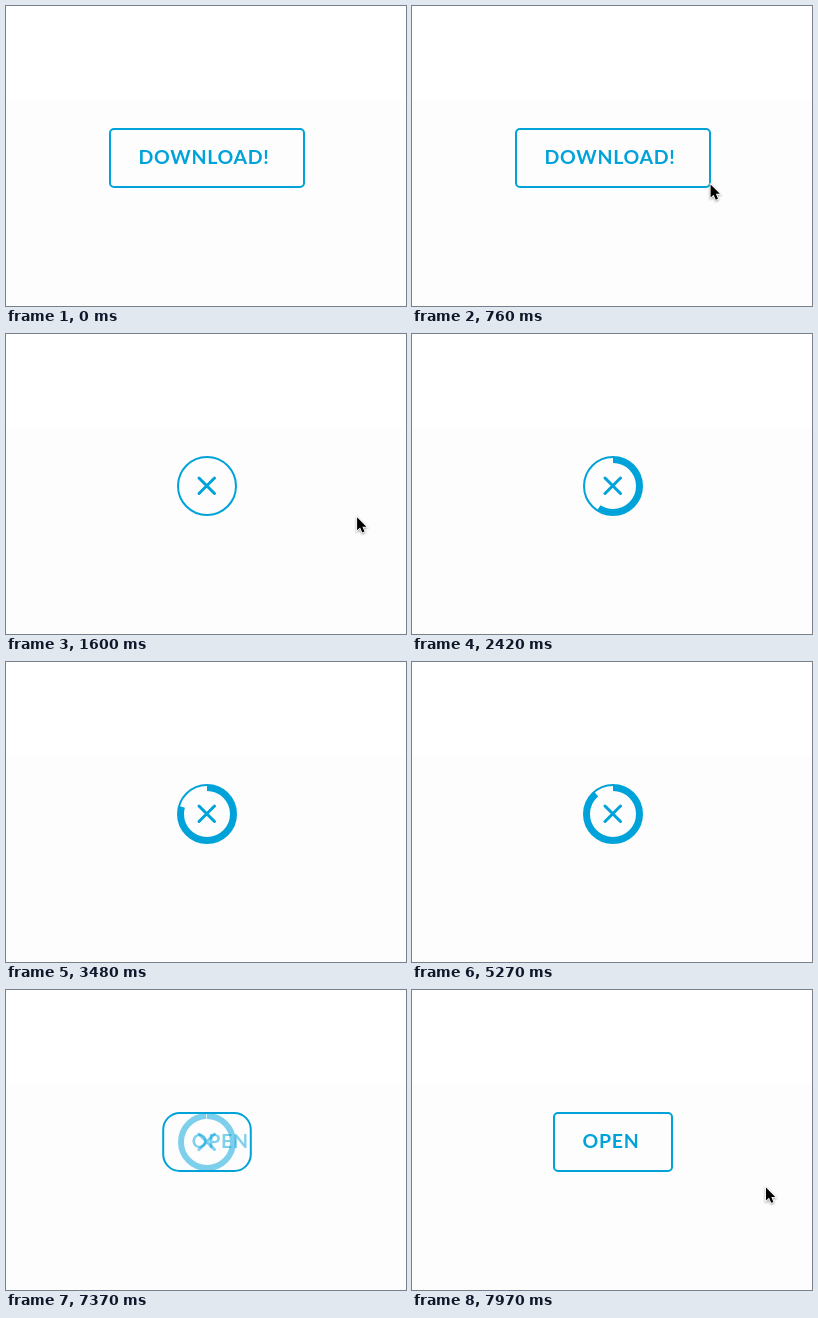
Write an HTML page that moves like this. It is 400 px wide and 300 px high and loops after 8 s.

```html
<!DOCTYPE html>
<html lang="en">
<head>
<meta charset="utf-8">
<title>Download button</title>
<style>
  html, body { margin: 0; height: 100%; overflow: hidden; background: #fff; }
  svg { display: block; width: 100vw; height: 100vh; }
  text { font: 700 19.5px Lato, sans-serif; letter-spacing: .7px; fill: #00a3d9; }
  .line { fill: none; stroke: #00a3d9; }
</style>
</head>
<body>
<svg viewBox="0 0 400 300">
  <rect y="94" width="400" height="206" fill="#fdfdfd"/>
  <rect id="box" class="line" y="123" height="58" stroke-width="2"/>
  <circle id="ring" class="line" cx="201" cy="152" r="26" stroke-width="6"
          pathLength="1" transform="rotate(-90 201 152)"/>
  <path id="cross" class="line" d="M193 144l15.5 15.5m0-15.5L193 159.5"
        stroke-width="3" stroke-linecap="round"/>
  <text id="label" y="158"></text>
  <path id="cursor" d="M0 .6V13.6L3 10.8 5.2 15.8 7.4 14.9 5.3 10H9.3Z" stroke="#fff" stroke-width="1.6"
        paint-order="stroke" style="filter: drop-shadow(0 1px 1px #0006)"/>
</svg>
<script>
const LOOP = 8000, CENTER = 201;
const [box, ring, cross, label, cursor] =
  ['box', 'ring', 'cross', 'label', 'cursor'].map(id => document.getElementById(id));

const mix = (a, b, p) => a + (b - a) * p;
const span = (t, start, length) => Math.min(1, Math.max(0, (t - start) / length));

// CSS "ease": cubic-bezier(.25, .1, .25, 1)
function ease(x) {
  const bezier = (a, b, s) => 3 * a * s * (1 - s) ** 2 + 3 * b * s * s * (1 - s) + s ** 3;
  let low = 0, high = 1;
  for (let i = 0; i < 20; i++) {
    const mid = (low + high) / 2;
    if (bezier(.25, .25, mid) < x) low = mid; else high = mid;
  }
  return bezier(.1, 1, low);
}
const move = (t, start, length) => ease(span(t, start, length));

// [start time, added share of the ring]
const loads = [[2110, .592], [3175, .203], [4950, .093], [6925, .107]];

function cursorAt(t) {
  if (t >= 7890) {
    const p = span(t, 7890, 80);
    return [mix(394, 354, p), mix(199, 197, p)];
  }
  if (t < 410 || t >= 1680) return null;
  if (t < 1140) {
    const p = 1 - (1 - span(t, 400, 730)) ** 1.8;
    return [mix(399, 257, p), mix(221, 160, p)];
  }
  const p = span(t, 1140, 530) ** 1.5;
  return [mix(257, 373, p), mix(160, 188, p)];
}

function draw(t) {
  const close = move(t, 1142, 200), open = move(t, 7313, 200);
  const width = open ? mix(60, 120, open) : mix(196, 60, close);
  const left = CENTER - width / 2;
  box.setAttribute('x', left + 1);
  box.setAttribute('width', width - 2);
  // The corners round off more slowly than the width shrinks
  box.setAttribute('rx', open ? mix(29, 4, open) : mix(4, 29, close ** 2));

  const loaded = loads.reduce((sum, [start, share]) => sum + share * move(t, start, 310), 0);
  ring.setAttribute('stroke-dasharray', `${loaded} 2`);
  ring.style.opacity = loaded ? 1 - open : 0;
  cross.style.opacity = move(t, 1340, 200) * (1 - open);

  label.textContent = t < 1142 ? 'DOWNLOAD!' : 'OPEN';
  label.setAttribute('x', left + 29.6);
  label.style.opacity = t < 1142 ? 1 : open;

  const at = cursorAt(t);
  cursor.style.display = at ? '' : 'none';
  if (at) cursor.setAttribute('transform', `translate(${at})`);
}

function tick() {
  draw(performance.now() % LOOP);
  requestAnimationFrame(tick);
}
tick();
</script>
</body>
</html>
```
